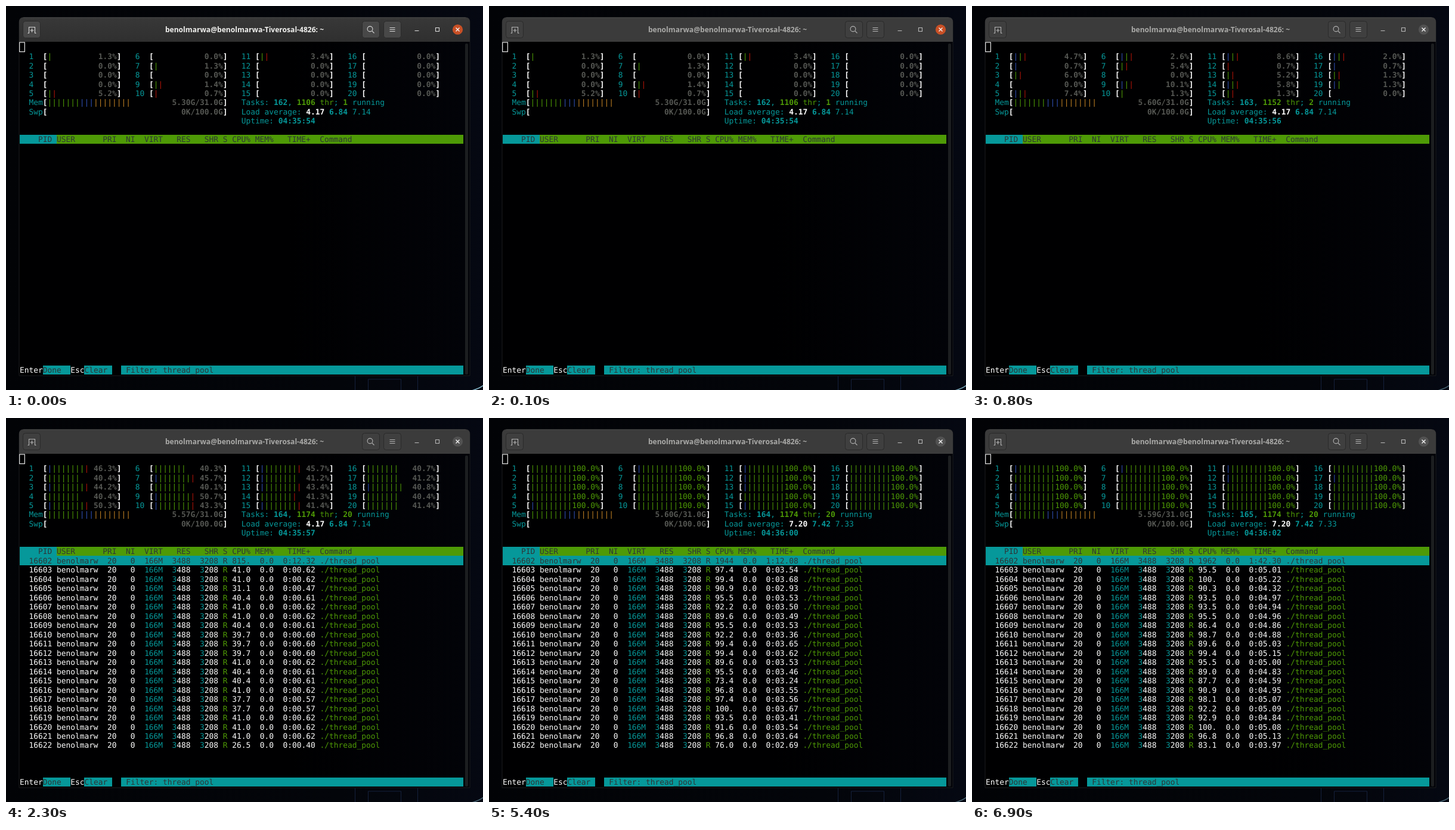
An HTML page that plays this animation: 800 px wide and 644 px high, repeating every 8000 ms.

```html
<!DOCTYPE html>
<html lang="en">
<head>
<meta charset="utf-8">
<title>Process monitor</title>
<style>
  html, body { margin: 0; width: 100%; height: 100%; overflow: hidden; background: #020307; }
  svg { display: block; width: 800px; height: 644px; }
  .term text { font: 12.866px "DejaVu Sans Mono", monospace; white-space: pre; text-rendering: geometricPrecision; }
  .term .b { font-weight: 700; }
  .title { font: 700 12.1px "Open Sans", sans-serif; text-anchor: middle; }
  .icon { fill: none; stroke: #c8c8c8; stroke-width: 1.1; }
</style>
</head>
<body>
<svg viewBox="0 0 800 644" xmlns="http://www.w3.org/2000/svg">
  <defs>
    <linearGradient id="sky">
      <stop offset="0" stop-color="#020306"/>
      <stop offset=".7" stop-color="#03050a"/>
      <stop offset="1" stop-color="#050812"/>
    </linearGradient>
    <linearGradient id="glass">
      <stop offset=".6" stop-color="#000001"/>
      <stop offset="1" stop-color="#020308"/>
    </linearGradient>
    <linearGradient id="active" x2="0" y2="1">
      <stop offset="0" stop-color="#383838"/>
      <stop offset="1" stop-color="#2f2f2f"/>
    </linearGradient>
  </defs>
  <rect width="800" height="644" fill="url(#sky)"/>
  <path d="M585.5 644V621M607.5 644V626H662.5V644M690.5 644V621" fill="none" stroke="#15213c"/>
  <path id="streak" d="M781 645Q793 642 801 636" fill="none" stroke="#86b9cc" stroke-width="1.5"/>

  <path d="M22 620V27Q22 19 30 19H770Q778 19 778 27V620Z" fill="url(#glass)" stroke="#1b1c1f"/>
  <path id="bar" d="M22 60V27Q22 19 30 19H770Q778 19 778 27V60Z"/>
  <path d="M29 19.5H771" stroke="#484848"/>
  <g id="buttons" stroke="#2a2a2a">
    <rect x="28.5" y="25.5" width="29" height="28" rx="4"/>
    <rect x="597.5" y="25.5" width="29" height="28" rx="4"/>
    <rect x="633.5" y="25.5" width="29" height="28" rx="4"/>
  </g>
  <text id="title" class="title" x="400" y="44">benolmarwa@benolmarwa-Tiverosal-4826: ~</text>
  <g id="icons" class="icon">
    <path d="M36.5 45.5H38.5V35.5H48.5V45.5H50.5M43.5 38V44M40.5 41H46.5"/>
    <circle cx="610.5" cy="38.5" r="4.4"/>
    <path d="M613.8 41.8L617.5 45.5"/>
    <path d="M643.5 36.5H652.5M643.5 39.5H652.5M643.5 42.5H652.5"/>
    <path d="M685.5 41.5H692.5"/>
    <rect x="720.5" y="36.5" width="6" height="6"/>
  </g>
  <circle id="close" cx="757.5" cy="39.5" r="8.6"/>
  <path d="M754.5 36.5L760.5 42.5M760.5 36.5L754.5 42.5" stroke="#f2f2f2" stroke-width="1.4"/>

  <rect x="770" y="63" width="5" height="555" rx="2" fill="#1c1e20"/>
  <rect x="22.7" y="61" width="8.6" height="15.7" fill="none" stroke="#fff" stroke-width="1.1"/>
  <g id="term" class="term"></g>
</svg>
<script>
const LOOP = 8000, X0 = 23, Y0 = 60.9, CW = 7.746, RH = 15.48;
const USER = 'benolmarw';
const GREEN = '#4e9a06', CYAN = '#06989a', WHITE = '#fff', GREY = '#555753', INK = '#2e3436';
const BAR = { b: '#3050b4', g: GREEN, r: '#b01408', y: '#c08024' };
const METER_COLS = [2, 25, 48, 71];
const HEADER = '    PID USER      PRI  NI  VIRT   RES   SHR S CPU% MEM%   TIME+  Command';
const list = s => s.split(' ');
const $ = id => document.getElementById(id);

// Full load: nine bars per core, the given cores begin with low-priority blue
const full = low => ({
  load: Array(20).fill('100.0'),
  bars: Array.from({ length: 20 }, (_, i) => low.includes(i + 1) ? 'bg8' : 'g9')
});

// times: CPU hundredths per row, process first; tick: hundredths for one percent
const states = [
  { at: 0, mem: '5.30', tasks: 162, threads: 1106, running: 1, up: '04:35:54', avg: list('4.17 6.84 7.14'),
    load: list('1.3 0.0 0.0 0.0 5.2 0.0 1.3 0.0 1.4 0.7 3.4 0.0 0.0 0.0 0.0 0.0 0.0 0.0 0.0 0.0'),
    bars: list('g . . . gr . g . gr r gr . . . . . . . . .') },
  { at: 800, mem: '5.60', tasks: 163, threads: 1152, running: 2, up: '04:35:56', avg: list('4.17 6.84 7.14'),
    load: list('4.7 0.7 6.0 0.0 7.4 2.6 5.4 0.0 10.1 1.3 8.6 0.7 5.2 5.8 1.3 2.0 0.7 1.3 1.3 0.0'),
    bars: list('bgr b gr . bgr bgr gr . bgr g bgr r gr bgr gr bgr b gr bg .') },
  { at: 2300, mem: '5.57', tasks: 164, threads: 1174, running: 20, up: '04:35:57', avg: list('4.17 6.84 7.14'),
    load: list('46.3 40.4 44.2 40.4 50.3 40.3 45.7 40.1 50.7 43.3 45.7 41.2 43.4 41.3 41.4 40.7 41.2 40.8 40.4 41.4'),
    bars: list('bg7r g7 bg7r g7 bg7r g7 bg7r g7 bg7r bg7r bg7r bg7 bg7r g7r bg7r g7 g7 bg7 g7 g7'),
    tick: 1.511,
    times: list('1232 62 62 47 61 62 62 61 60 60 60 62 61 61 62 57 57 62 62 62 40') },
  { at: 3900, mem: '5.58', tasks: 164, threads: 1174, running: 20, up: '04:35:59', avg: list('7.20 7.42 7.33'),
    ...full([5, 6, 7, 8, 11, 20]), tick: 1.5325,
    times: list('4214 204 215 153 206 208 211 206 194 212 209 215 199 211 206 206 213 197 213 215 152') },
  { at: 5400, mem: '5.60', tasks: 164, threads: 1174, running: 20, up: '04:36:00', avg: list('7.20 7.42 7.33'),
    ...full([5, 6, 11, 12, 13, 15]), tick: 1.5397,
    times: list('7208 354 368 293 353 350 349 353 336 365 362 353 346 324 355 356 367 341 354 364 269') },
  { at: 6900, mem: '5.59', tasks: 165, threads: 1174, running: 20, up: '04:36:02', avg: list('7.20 7.42 7.33'),
    ...full([1, 3, 4, 6, 11, 12, 17]), tick: 1.5397,
    times: list('10230 501 522 432 497 494 496 486 488 503 515 500 483 459 495 507 509 484 508 513 397') }
];

const text = (col, row, str, fill, bold) =>
  `<text x="${(X0 + col * CW).toFixed(2)}" y="${(Y0 + row * RH + 12.7).toFixed(2)}" fill="${fill}"${bold ? ' class="b"' : ''}>${str}</text>`;

// Cell backgrounds sit on whole pixels
function block(col, row, cols, fill) {
  const x = Math.round(X0 + col * CW), y = Math.round(Y0 + row * RH);
  const w = Math.round(X0 + (col + cols) * CW) - x, h = Math.round(Y0 + (row + 1) * RH) - y;
  return `<rect x="${x}" y="${y}" width="${w}" height="${h}" fill="${fill}"/>`;
}

// Consecutive [text, colour, bold] runs
function runs(col, row, parts) {
  let out = '';
  for (const [str, fill, bold] of parts) {
    out += text(col, row, str, fill, bold);
    col += String(str).length;
  }
  return out;
}

function meter(col, row, label, end, bars, value, valueFill) {
  const cells = bars.replace(/([a-z])(\d)/g, (_, c, n) => c.repeat(n)).replace('.', '');
  return text(col, row, label, CYAN) + text(col + 3, row, '[', WHITE, true) +
    [...cells].map((c, i) => text(col + 4 + i, row, '|', BAR[c])).join('') +
    text(end - value.length, row, value, valueFill, valueFill === GREY) +
    text(end, row, ']', WHITE, true);
}

function clock(hundredths) {
  const sec = (hundredths % 6000 / 100).toFixed(2).padStart(5, '0');
  return Math.floor(hundredths / 6000) + ':' + sec;
}

function percent(p) {
  if (p >= 1000) return String(Math.floor(p));
  return p.toFixed(1).slice(0, 4);
}

function processRow(i, time, cpu) {
  const row = 11 + i, main = i === 0;
  const pick = c => main ? INK : c;
  return (main ? block(0, row, 96, CYAN) : '') + runs(2, row, [
    [16602 + i + ' ' + USER + '  20   0  ', pick(WHITE)],
    ['166M  ', pick(CYAN)],
    ['3', pick(CYAN)], ['488  ', pick(WHITE)],
    ['3', pick(CYAN)], ['208 ', pick(WHITE)],
    ['R ', pick(GREEN)],
    [cpu.padStart(4) + '  0.0  ' + clock(time) + ' ', pick(WHITE)],
    ['./thread_pool', pick(GREEN)]
  ]);
}

function screen(s, before) {
  let out = '';
  s.load.forEach((load, i) => {
    const col = METER_COLS[Math.floor(i / 5)];
    out += meter(col, 1 + i % 5, i + 1, col + 19, s.bars[i], load + '%', load === '100.0' ? GREEN : GREY);
  });
  out += meter(2, 6, 'Mem', 44, 'g7b3y8', s.mem + 'G/31.0G', GREY);
  out += meter(2, 7, 'Swp', 44, '.', '0K/100.0G', GREY);
  out += runs(48, 6, [['Tasks: ', CYAN], [s.tasks, CYAN, true], [', ', CYAN], [s.threads, GREEN, true],
    [' thr', GREEN], ['; ', CYAN], [s.running, GREEN, true], [' running', CYAN]]);
  out += runs(48, 7, [['Load average: ', CYAN], [s.avg[0] + ' ', WHITE, true],
    [s.avg[1] + ' ', CYAN, true], [s.avg[2], CYAN]]);
  out += runs(48, 8, [['Uptime: ', CYAN], [s.up, CYAN, true]]);

  out += block(0, 10, 96, GREEN) + block(0, 10, 8, CYAN) + text(0, 10, HEADER, INK);
  (s.times || []).forEach((time, i) => {
    const used = time - (before && before.times ? before.times[i] : 0);
    out += processRow(i, +time, percent(used / s.tick));
  });

  out += block(5, 35, 6, CYAN) + block(14, 35, 6, CYAN) + block(22, 35, 74, CYAN);
  out += runs(0, 35, [['Enter', WHITE], ['Done  ', INK], ['Esc', WHITE], ['Clear ', INK],
    ['   ', INK], ['Filter: thread_pool', INK]]);
  return out;
}

const mix = (a, b, k) => 'rgb(' + a.map((v, i) => Math.round(v + (b[i] - v) * k)) + ')';

// The window loses focus in four steps
function drawFocus(step) {
  const off = step > 0, k = [0, 0, 0.4, 0.75, 1][step];
  $('bar').setAttribute('fill', off ? '#3b3b3b' : 'url(#active)');
  $('buttons').setAttribute('fill', off ? '#3f3f3f' : '#484848');
  $('title').setAttribute('fill', off ? '#a9a9a7' : '#f0f0ee');
  $('icons').style.stroke = off ? '#b4b4b4' : '#d8d8d8';
  $('close').setAttribute('fill', mix([200, 80, 38], [82, 82, 82], k));
  $('streak').setAttribute('opacity', 1 - step * 0.12);
}

let shown = -1, focus = -1;
function draw(t) {
  const step = Math.min(4, Math.floor(t / 100));
  if (step !== focus) drawFocus(focus = step);
  const n = states.findLastIndex(s => t >= s.at);
  if (n !== shown) {
    shown = n;
    $('term').innerHTML = screen(states[n], states[n - 1]);
  }
}

const start = performance.now();
function tick() {
  draw((performance.now() - start) % LOOP);
  requestAnimationFrame(tick);
}
tick();
</script>
</body>
</html>
```
